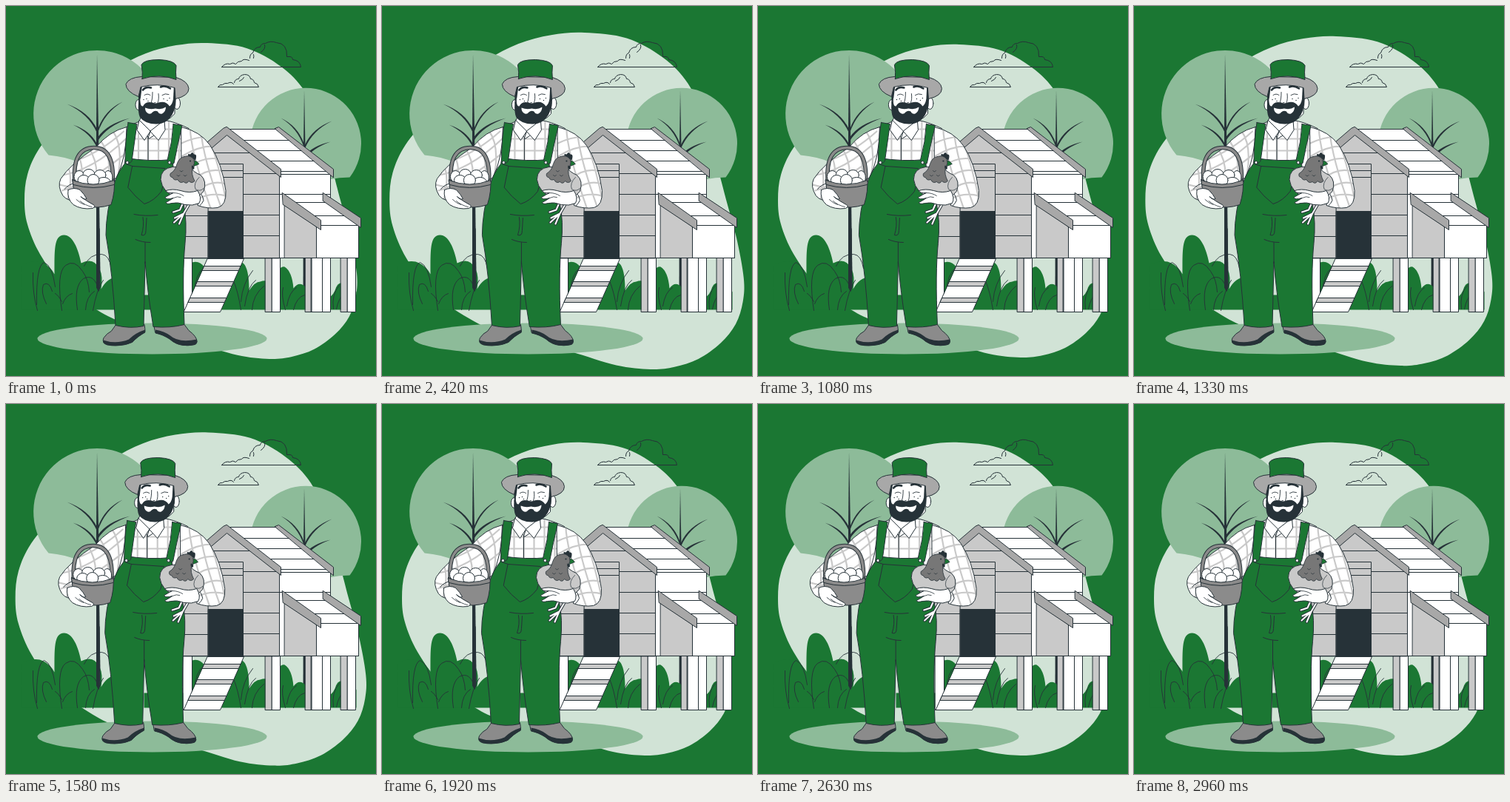
An HTML page with a canvas for the animation above (3 s loop, 500 px wide and 500 px high).

```html
<!DOCTYPE html>
<html lang="en">
<head>
<meta charset="utf-8">
<title>Farmer and coop</title>
<style>
html, body { margin: 0; width: 100%; height: 100%; overflow: hidden; background: #1b7733; }
canvas { display: block; width: 100vw; height: 100vh; }
</style>
</head>
<body>
<canvas id="stage"></canvas>
<script>
const canvas = document.getElementById('stage');
const ctx = canvas.getContext('2d');
const LOOP = 3000, LEAD = 26;
const GREEN = '#1b7733', PALE = '#d1e3d6', LEAF = '#8dbb99', INK = '#263238';
const WHITE = '#fff', LIGHT = '#c9c9c9', MID = '#a8a8a8', DARK = '#8b8b8b';

// [progress, value] pairs, linear between
const PULSE = [[0, 1], [.1, 1.1], [.3, 1], [.4, 1], [.5, 1.1], [.6, 1], [1, 1]];
const SWAY = [[0, 0], [.1, 1.9], [.3, 1.9], [.45, .9], [.7, -1.8], [.8, -.8], [.95, 0], [1, 0]];

function track(keys, p) {
  const i = Math.max(1, keys.findIndex(k => p <= k[0]));
  const [a, u] = keys[i - 1], [b, v] = keys[i];
  return u + (v - u) * (p - a) / (b - a);
}

const cache = {};
const path = d => cache[d] || (cache[d] = new Path2D(d));

function draw(d, fill, line, w = 1) {
  const p = path(d);
  if (fill) { ctx.fillStyle = fill; ctx.fill(p); }
  if (line) { ctx.strokeStyle = line; ctx.lineWidth = w; ctx.stroke(p); }
}
const shape = (d, fill) => draw(d, fill, INK, 1);
const lines = (d, w = 1, color = INK) => draw(d, null, color, w);
const box = (x, y, r, b, fill) => shape(`M${x} ${y}H${r}V${b}H${x}Z`, fill);

function tube(d, w, fill) {
  lines(d, w + 2);
  lines(d, w, fill);
}

function ellipse(x, y, rx, ry, fill, line) {
  ctx.beginPath();
  ctx.ellipse(x, y, rx, ry, 0, 0, 7);
  if (fill) { ctx.fillStyle = fill; ctx.fill(); }
  if (line) { ctx.strokeStyle = INK; ctx.lineWidth = 1; ctx.stroke(); }
}

// closed smooth curve through points
function smooth(pts) {
  const n = pts.length, at = i => pts[(i + n) % n];
  let d = `M${pts[0]}`;
  for (let i = 0; i < n; i++) {
    const [a, b, c, e] = [at(i - 1), at(i), at(i + 1), at(i + 2)];
    d += `C${b[0] + (c[0] - a[0]) / 6} ${b[1] + (c[1] - a[1]) / 6} ` +
         `${c[0] - (e[0] - b[0]) / 6} ${c[1] - (e[1] - b[1]) / 6} ${c[0]} ${c[1]}`;
  }
  return d + 'Z';
}

const BLOB = smooth([[272, 52], [325, 59], [370, 83], [402, 116], [424, 165], [439, 220],
  [450, 262], [463, 310], [472, 360], [471, 390], [462, 418], [443, 442], [415, 462], [385, 472],
  [355, 475], [312, 470], [255, 453], [200, 440], [160, 427], [125, 410], [80, 378],
  [48, 335], [31, 295], [27, 262], [31, 228], [47, 193], [80, 153], [113, 118],
  [149, 87], [189, 66], [230, 55]]);

function plaid(d, grid) {
  draw(d, WHITE);
  ctx.save();
  ctx.clip(path(d));
  lines(grid, 2.2, LIGHT);
  ctx.restore();
  lines(d);
}

function blob(scale) {
  ctx.save();
  ctx.translate(250, 263.5);
  ctx.scale(scale, scale);
  ctx.translate(-250, -263.5);
  draw(BLOB, PALE);
  ctx.restore();
}

// tapering twig from tip to trunk, sagging to the lower side
function twig(x, y, tx, ty) {
  const mx = x + (tx - x) * .72, my = y + (ty - y) * .3;
  draw(`M${x} ${y}Q${mx} ${my} ${tx} ${ty}V${ty + 5}Q${mx} ${my + 3} ${x} ${y}Z`, INK);
}

function trees() {
  draw('M57 201A86 86 0 1 1 200 183Q170 222 130 220Q112 219 98 211Q80 203 57 201Z', LEAF);
  draw('M345 231A75 75 0 1 1 464 231Q450 231 436 234Q390 250 345 231Z', LEAF);
  draw('M122.5 64L124.5 166L127 380L124.5 386L121.5 380L121.5 166Z', INK);
  twig(82, 132, 122.5, 166);
  twig(90, 160, 122.5, 186);
  twig(157, 129, 123.5, 166);
  twig(167, 151, 123.5, 177);
  draw('M402.5 113L404 190L405.5 405H401L401.5 190Z', INK);
  twig(440, 155, 403.5, 187);
  twig(371, 151, 402, 185);
  twig(438, 183, 403.5, 202);
  twig(375, 180, 402, 200);
}

function bushes() {
  draw('M20 410V350Q38 341 50 347Q60 352 65 362C65 330 64 309 78 309C89 309 97 326 101 347Q118 338 126 355' +
       'Q131 365 128 382Q137 366 150 366V410Z', GREEN);
  draw('M186 410V390H240V352Q258 338 268 353Q278 363 278 378Q290 350 302 356Q310 343 320 347Q328 354 328 384' +
       'Q336 372 343 372Q354 368 360 378Q366 350 376 352Q386 358 388 381Q396 370 405 380L432 395' +
       'Q440 393 444 384Q448 370 457 375Q470 376 473 386V410Z', GREEN);
  draw('M121.5 300H126.2L127 380L124.5 386L121.5 380Z', INK);
  lines('M42 411Q35 388 36 360M41 403Q40 350 51 346Q62 350 66 379M54 402Q46 386 50 376Q58 371 62 385' +
        'M75 411Q67 360 80 350Q92 341 103 358Q111 369 112 386M76 402Q80 391 89 388M75 399Q70 390 66 388' +
        'M96 410Q91 378 104 368Q119 360 125 384M107 410Q108 392 119 385M117 411Q122 382 131 370' +
        'M105 351Q113 334 129 335Q139 336 142 354', .9);
  lines('M256 398Q252 372 262 358Q270 349 281 356M317 410Q313 385 307 371M317 399Q319 374 333 357' +
        'M322 405Q326 378 337 370M332 410Q333 390 348 378M377 410Q371 390 374 380M379 405Q382 386 392 380' +
        'M388 410Q392 393 403 390M442 409Q439 389 450 377M446 409Q449 394 455 390', .9);
}

function clouds() {
  lines('M291 82H398Q397 73 387 72Q387 67 379 68Q380 50 365 49Q357 46 350 50Q344 50 343 55Q335 55 333 63' +
        'Q329 64 329 70M291 82Q296 76 302 78Q306 75 310 78Q312 74 318 74Q320 70 328 73' +
        'M334 70Q335 67 334 65M344 62Q351 57 349 52');
  lines('M286 109H341Q340 104 335 103Q334 98 330 98Q329 92 322 92Q315 93 314 98Q309 98 308 103' +
        'M286 109Q288 105 292 106Q295 103 299 104Q304 101 307 105M315 101Q320 99 321 96');
}

function coop() {
  // legs
  box(239, 340, 251, 413, WHITE);
  [[350, 359, 370], [404, 412, 424], [427, 427, 438], [452, 461, 472]].forEach(([a, b, c]) => {
    box(a, 340, b, 413, LIGHT);
    box(b, 340, c, 413, WHITE);
  });
  box(413, 340, 427, 413, WHITE);
  // side wall and roof
  box(368, 222, 438, 340, WHITE);
  lines('M369 227H438M369 254H438');
  shape('M297 166H368L442 221V227H371Z', WHITE);
  lines('M317 181H389M336 195H408M355 209H427M370 223H442');
  shape('M363 165L368 163L442 220V231Z', MID);
  // front
  shape('M238 340V222L298 168L369 226V340Z', LIGHT);
  lines('M262 198H338M238 226H369M320 254H369M320 282H369M320 310H369M238 254H273M238 283H273M238 311H273');
  box(273, 213, 320, 340, LIGHT);
  box(273, 222, 320, 231, LIGHT);
  box(273, 277, 320, 340, INK);
  shape('M298 163L371 220V231L298 174L258 208V195L293 165Z', MID);
  // nest box
  shape('M374 254H429L476 290V340H419V296Z', WHITE);
  lines('M391 265H441M411 283H461M421 296H476');
  shape('M376 266L419 298V340H376Z', LIGHT);
  shape('M373 252L425 289V302L374 268Z', MID);
  shape('M428 252L479 286V299L428 263Z', MID);
  lines('M238 340H476');
  // ramp
  shape('M272 341H321L289 413H240Z', WHITE);
  [[351, 357], [372, 378], [394, 400]].forEach(([t, b]) => {
    const l = y => 272 - (y - 341) * .444, r = y => 321 - (y - 341) * .444;
    shape(`M${l(t)} ${t}H${r(t)}L${r(b)} ${b}H${l(b)}Z`, LIGHT);
  });
}

function shirt() {
  plaid('M178 156Q165 161 153 168L152 225H242L246 165Q225 155 213 154Z',
    'M165 150V230M178 150V230M191 150V230M205 150V230M219 150V230M233 150V230M145 179H245M145 195H245M145 166H245');
  plaid('M162 163Q138 169 121 190Q85 214 73 233Q68 243 76 256Q83 264 95 262L108 244L148 232Q162 205 162 163Z',
    'M70 229Q115 223 162 178M75 249Q118 235 165 195M95 208Q128 196 158 169M96 200Q107 220 98 262M110 190Q127 214 119 250' +
    'M126 180Q144 205 136 240M143 168Q157 187 151 225M82 215Q90 230 82 262M66 240Q92 244 108 256');
  plaid('M236 163Q262 169 275 188Q291 212 296 249Q297 269 285 272Q272 274 258 269L262 245Q242 225 236 205Z',
    'M248 160Q246 190 278 280M262 165Q265 205 292 278M275 182Q288 220 297 265M234 186Q252 177 270 176M236 203Q260 188 282 189' +
    'M243 219Q267 201 290 207M254 233Q275 216 296 224M260 247Q280 233 299 241M258 260Q278 250 300 257');
  lines('M258 250Q264 252 266 262Q264 267 261 269M78 247Q84 240 92 239');
}

function overalls() {
  shape('M161 205Q194 210 224 207L225 217Q235 240 239 268Q244 290 241 320Q237 360 240 430Q221 435 198 433Q190 385 187 345' +
        'L185 432Q167 436 147 431Q143 360 134 309Q134 278 145 240Q149 226 159 213Z', GREEN);
  shape('M164 157L176 159L169 209Q165 215 160 210Q160 182 164 157Z', GREEN);
  shape('M225 159L237 161Q231 186 226 212Q221 215 217 208Q224 183 225 159Z', GREEN);
  ellipse(163, 211, 2, 2, WHITE, true);
  ellipse(220, 211, 2, 2, WHITE, true);
  lines('M170 216L214 219Q213 238 209 250Q199 263 186 267Q173 257 164 245ZM161 213L170 216' +
        'M172 281Q187 284 204 282M184 285Q186 297 182 309Q188 311 188 303L189 286M174 315Q183 319 194 319M187 319V347');
}

function shoes() {
  shape('M148 430H186Q187 435 187 440Q177 446 169 454Q155 460 136 457Q128 455 131 448Q135 442 141 439Z', DARK);
  shape('M199 430H240L246 438Q257 446 257 453Q254 459 239 458Q228 457 220 449Q211 443 201 441Z', DARK);
  draw('M130 451Q148 457 165 450Q174 441 187 437V441Q177 446 170 454Q155 461 136 458Q129 456 130 451Z', INK);
  draw('M201 437Q213 439 221 445Q232 455 257 450Q259 457 252 458Q232 461 220 450Q211 444 201 442Z', INK);
}

function basket() {
  tube('M92 238Q88 191 118 191Q146 191 143 238', 3.6, DARK);
  shape('M89 234Q90 262 104 270Q124 274 141 268Q147 249 145 233Q117 247 89 234Z', DARK);
  [[98, 230, 7, 8], [137, 231, 6, 9], [111, 227, 8, 7], [126, 228, 8, 7], [104, 235, 8, 7], [131, 237, 9, 6], [117, 235, 8, 8]]
    .forEach(e => ellipse(...e, WHITE, true));
  shape('M89 235Q117 246 145 235Q147 239 145 241Q117 249 90 241Z', DARK);
  shape('M83 248Q91 244 99 248Q105 254 108 260Q104 262 100 257Q109 264 117 268Q121 270 116 273Q101 275 90 268' +
        'Q81 260 83 248Z', WHITE);
  lines('M99 263Q106 269 115 271M94 261Q99 266 105 268', .8);
}

function hen() {
  tube('M238 266L234 275L225 278M246 268L239 280L227 286M239 280L226 292M239 280L233 294', 2, WHITE);
  shape('M224 217Q208 219 208 234Q210 251 231 260Q258 262 266 250Q271 236 262 228Q252 224 248 217Z', LIGHT);
  draw('M246 204Q243 198 248 200Q251 195 253 200Q258 199 255 208Z', INK);
  draw('M253 208Q257 209 260 213L253 216Z', GREEN, INK, .8);
  draw('M240 203Q248 200 253 207Q255 212 251 218Q249 227 254 236Q250 240 246 236Q243 241 239 237Q234 240 231 234' +
       'Q226 236 224 231Q220 231 221 226Q228 222 230 213Q233 204 240 203Z', '#777', INK, .8);
  draw('M250 215Q255 216 253 220Q249 221 250 215Z', INK);
  ellipse(248, 209, 1.1, 1.1, INK);
  lines('M260 231Q252 239 255 247Q261 251 266 246M234 222q2 3 4 0M230 228q2 3 4 0M239 228q2 3 4 0', .7);
  shape('M215 249Q224 246 235 249Q247 253 258 249Q264 259 260 266Q251 270 241 268Q231 264 223 266Q216 268 215 265' +
        'Q221 262 225 259Q215 262 214 258Q221 254 225 252Q216 253 215 249Z', WHITE);
  lines('M225 259Q231 256 235 258M225 252Q233 252 239 256', .8);
}

function head() {
  shape('M184 145L179 155Q188 171 192 179Q205 172 213 155L219 145Z', WHITE);
  shape('M179 154L176 167L186 181L194 169Z', WHITE);
  shape('M213 154L214 167L205 181L194 169Z', WHITE);
  lines('M191 178V207M194 169L191 178');
  ellipse(178, 133, 4, 7, WHITE, true);
  ellipse(230, 131, 4.5, 8, WHITE, true);
  shape('M180 104H227V145Q217 157 201 157Q182 156 180 142Z', WHITE);
  draw('M178 107H183L181 123L178 132Z', INK);
  draw('M226 105H230L228 136L225 125Z', INK);
  draw('M178 130L180 127Q181 136 184 135Q188 128 196 130Q201 132 205 130Q215 127 220 135Q224 132 225 125L228 130' +
       'Q227 143 221 150Q215 159 202 159Q187 159 180 150Q177 143 178 130Z', INK);
  draw('M187 137Q194 140 201 138Q209 140 215 136Q215 142 210 145Q206 146 204 142Q200 140 197 143Q194 147 190 144Q187 142 187 137Z', WHITE);
  lines('M184 113Q188 108 195 110M208 109Q214 106 221 111', 2.6);
  lines('M186 120Q190 117 194 120M210 120Q214 117 219 119M197 116Q197 126 195 130Q198 132 201 130M205 118Q206 126 204 130', .9);
  [[185, 126], [189, 125], [191, 128], [212, 125], [217, 127], [220, 124]]
    .forEach(([x, y]) => ellipse(x, y, .7, .7, INK));
  shape('M182 95Q165 96 161 105Q161 115 178 122L181 109Q203 103 227 110L228 125Q246 121 246 111Q245 101 229 96Z', MID);
  shape('M183 98Q184 89 182 79Q185 72 206 72Q226 73 229 80Q228 89 229 99Q206 90 183 98Z', GREEN);
}

function man(dx) {
  ctx.save();
  ctx.translate(dx, 0);
  shoes();
  shirt();
  overalls();
  head();
  basket();
  hen();
  ctx.restore();
}

function render(ms) {
  const t = (ms + LEAD) % LOOP;
  const size = Math.round(innerWidth * devicePixelRatio) || 500;
  if (canvas.width !== size) canvas.width = canvas.height = size;
  const k = size / 500;
  ctx.setTransform(k, 0, 0, k, 0, 0);
  ctx.lineJoin = ctx.lineCap = 'round';
  ctx.fillStyle = GREEN;
  ctx.fillRect(0, 0, 500, 500);
  blob(track(PULSE, t / LOOP));
  // half a pixel keeps straight lines crisp
  ctx.translate(.5, .5);
  trees();
  bushes();
  clouds();
  ellipse(197, 449, 155, 21, LEAF);
  coop();
  man(track(SWAY, t % 1000 / 1000));
}

const start = performance.now();
function frame() {
  render(performance.now() - start);
  requestAnimationFrame(frame);
}
frame();
</script>
</body>
</html>
```
